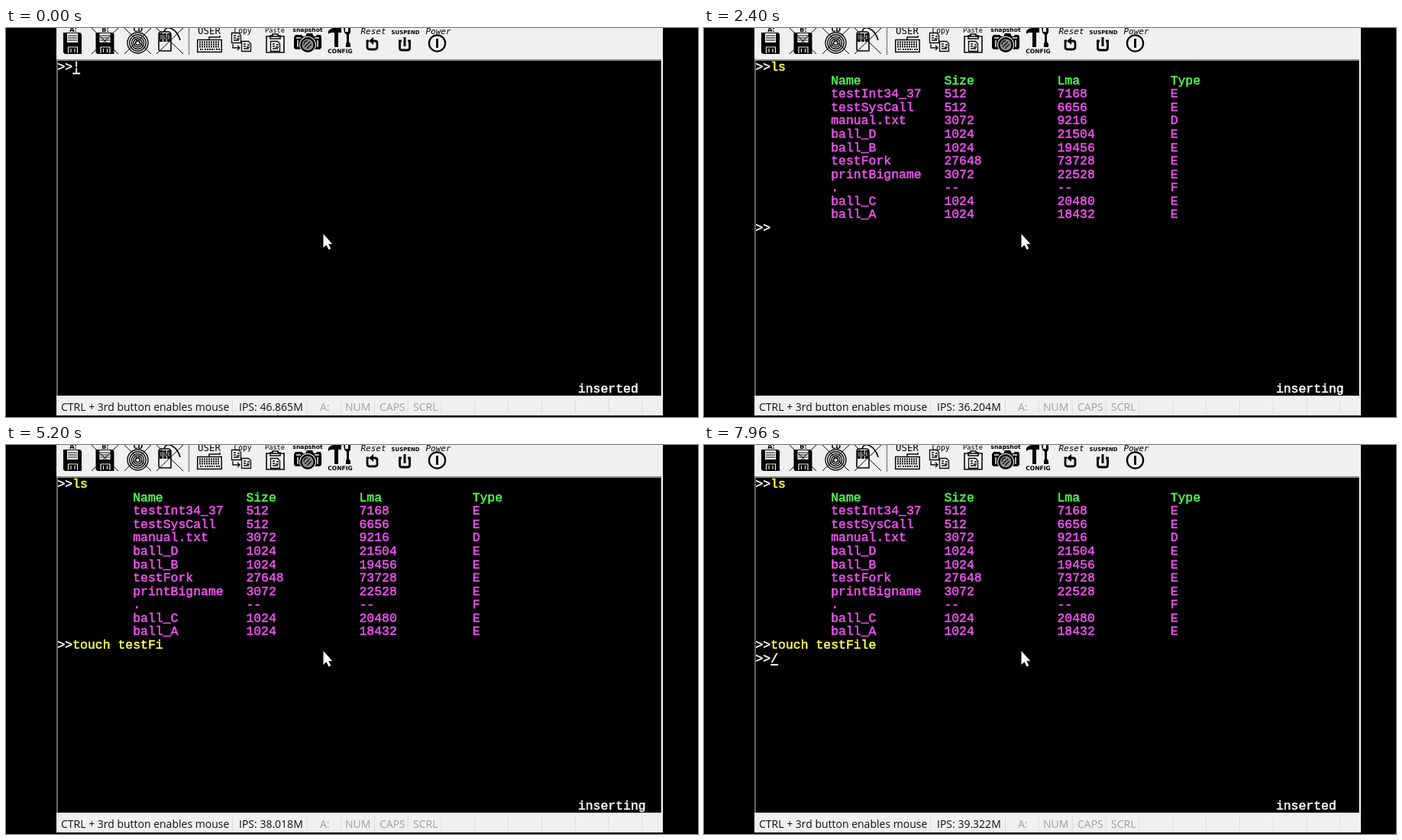
An HTML page that plays this animation: 906 px wide and 510 px high, repeating every 8000 ms.

```html
<!DOCTYPE html>
<html lang="en">
<head>
<meta charset="utf-8">
<title>Terminal session</title>
<style>
html, body { margin: 0; width: 100%; height: 100%; overflow: hidden; background: #000; }
svg { display: block; width: 100%; height: 100%; }
text { white-space: pre; }
#screen text { font: 16.458px "Liberation Mono", monospace; stroke-width: .55; }
#status text { font: 14px "Open Sans", "Noto Sans", sans-serif; fill: #101010; }
#status .off { fill: #a0a0a0; }
#labels text { font: bold 8px "DejaVu Sans", sans-serif; text-anchor: middle; }
#labels .mono { font-family: "DejaVu Sans Mono", monospace; font-weight: normal; }
#labels .slant { font: italic 11px "DejaVu Sans Mono", monospace; }
.line { fill: none; stroke: #080808; }
.pale { fill: #f0f0ee; }
.light { fill: none; stroke: #f0f0ee; }
</style>
</head>
<body>
<svg viewBox="0 0 906 510" preserveAspectRatio="none">
  <rect width="906" height="510"/>
  <g class="pale">
    <path d="M66 0h794v41h-794zM66 482h794v26h-794z"/>
    <path d="M857.7 41h2.3v442h-2.3z"/>
  </g>
  <path d="M66 42H858" stroke="#8c8c8a" stroke-width="2"/>
  <path d="M67 43V482" stroke="#a0a09e" stroke-width="1.3"/>
  <path d="M239.5 0V35" stroke="#8a8a88" stroke-width="1.5"/>

  <g id="icons">
    <defs>
      <g id="floppy">
        <path d="M0 6h22l2 2v26H2l-2-2z"/>
        <path class="pale" d="M5 7h14v12H5z"/>
        <path class="line" d="M6 10h12M6 13h12M6 16h12" stroke-width="1.2"/>
        <path class="light" d="M6.5 33v-8h12v8M10 27v5M15 27v5" stroke-width="1.2"/>
      </g>
      <path id="cross" class="line" d="M0 0L35 34M35 0L0 34" stroke-width="1"/>
      <g id="sheet">
        <path class="pale" d="M.5 .5h9l3 3v10H.5z" stroke="#080808" stroke-width="1.3"/>
        <path class="line" d="M3 4h3M8 5h3M3 7h3M7 8h4M3 10h7" stroke-width="1.5"/>
      </g>
    </defs>
    <use href="#floppy" x="75"/>
    <use href="#floppy" x="117.5"/>
    <use href="#cross" x="112"/>
    <g class="line" id="disc"></g>
    <use href="#cross" x="155"/>
    <path class="line" d="M200 8q0-3 4-3h8q4 0 4 4v21h-14q-2 0-2-3zM207 5q2-8 10-4t11 15" stroke-width="1.6"/>
    <path d="M201 7h4v11h-4zM206 7h4v11h-4zM211 7h4v11h-4z"/>
    <path class="light" d="M203 9v6M208 9v6M213 9v6" stroke-width="1"/>
    <use href="#cross" x="197"/>

    <path class="line" d="M250.7 15.5h31.5v16h-31.5zM266 15v-3h14v-2" stroke-width="1.5"/>
    <path class="line" d="M253 18.5h27M253 21.5h27M253 24.5h27M254 28h4M260 28h13M275 28h5" stroke-width="2" stroke-dasharray="2 1"/>

    <use href="#sheet" x="295" y="6"/>
    <use href="#sheet" x="308" y="17"/>
    <path class="line" d="M297 21v5h9m-3-3l3 3-3 3" stroke-width="1.3"/>

    <path class="line" d="M341 11h23v21h-23zM346 14h13v-4h-3v-2h-7v2h-3z" stroke-width="1.6"/>
    <use href="#sheet" x="346" y="17"/>

    <path d="M377 12l2-3h8l2 2h3l2-4h7l2 4h2l2-2h5l1 3v14l-2 2h-32l-2-2z"/>
    <path class="light" d="M380 13h6M404 13h6M382 16v9M408 16v9" stroke-width="1.5"/>
    <circle class="pale" cx="395" cy="22" r="11"/>
    <circle cx="395" cy="22" r="10"/>
    <circle cx="395" cy="22" r="7.5" fill="#8e8e8c"/>
    <path class="line" d="M390 22q0-5 5-5M391 25l7-7M394 27l6-6" stroke-width="1.3"/>

    <path d="M422 4q3-4 8-4h9v6h-4v19h-5V6h-4q-2 0-4 2z"/>
    <path d="M442 0h2v5h4V0h3v6l-2 3v9l2 3v4h-6v-4l1-3V9l-3-3z"/>

    <path class="line" d="M475 17h-2v8q0 3 3 3h7q3 0 3-3v-5q0-3-3-3h-4" stroke-width="2.8"/>
    <path d="M475 17l6-5v10z"/>
    <path class="line" d="M518 17h-2.5v9q0 3 3 3h7q3 0 3-3v-9h-2.5M522 12v12" stroke-width="3"/>
    <circle class="line" cx="564.5" cy="20" r="10.6" stroke-width="2.3"/>
    <path class="line" d="M564.5 14v12" stroke-width="3"/>
  </g>
  <g id="labels"></g>
  <g id="status"></g>
  <g id="screen"></g>
  <path d="M415.5 270v18l4-3.6 3 6.2 2.8-1.3-3-6h5z" fill="#fff"/>
</svg>
<script>
const NS = "http://www.w3.org/2000/svg";
const LOOP = 8000, CELL = 9.875, ROW = 17.58, LEFT = 67.5, TOP = 43;
const WHITE = "#fafafa", YELLOW = "#fafa50", GREEN = "#52f852", PINK = "#f052f0";
const $ = id => document.getElementById(id);

function add(parent, tag, attrs, content = "") {
  const node = document.createElementNS(NS, tag);
  for (const key in attrs) node.setAttribute(key, attrs[key]);
  node.textContent = content;
  parent.appendChild(node);
  return node;
}

const colX = col => LEFT + col * CELL;
const rowY = row => TOP + row * ROW;
const print = (parent, col, row, color, str) =>
  add(parent, "text", { x: colX(col), y: rowY(row) + 13.1, fill: color, stroke: color }, str);

for (const r of [3, 5.5, 8, 10.7, 13.5])
  add($("disc"), "circle", { cx: 172.5, cy: 19.5, r, "stroke-width": 1.4 });

const labels = [
  ["A:", 88, 5, ""], ["B:", 130, 5, ""], ["CD", 173, 5, ""],
  ["USER", 266, 8, "mono", 12.4], ["Copy", 310, 7, "mono", 9.6], ["Paste", 352, 6, "mono", 8.6],
  ["snapshot", 395, 5, "", 7.6], ["CONFIG", 437.5, 33, "", 7.6],
  ["Reset", 481, 8, "slant"], ["SUSPEND", 523, 8, "", 6.9], ["Power", 566, 8, "slant"]
];
for (const [str, x, y, cls, size] of labels)
  add($("labels"), "text", { x, y, class: cls, style: size ? `font-size:${size}px` : "" }, str);

const bar = $("status");
for (let i = 0; i < 12; i++)
  add(bar, "path", { d: `M${i ? 394.5 + (i - 1) * 43.85 : 296.5} 486v19`, stroke: "#dcdcda" });
add(bar, "text", { x: 72, y: 501.5 }, "CTRL + 3rd button enables mouse");
const ips = add(bar, "text", { x: 305, y: 501.5 });
[["A:", 411], ["NUM", 444], ["CAPS", 489], ["SCRL", 533]]
  .forEach(([str, x]) => add(bar, "text", { x, y: 501.5, class: "off" }, str));

const screen = $("screen");
const listing = add(screen, "g", {});
const files = `Name Size Lma Type
testInt34_37 512 7168 E
testSysCall 512 6656 E
manual.txt 3072 9216 D
ball_D 1024 21504 E
ball_B 1024 19456 E
testFork 27648 73728 E
printBigname 3072 22528 E
. -- -- F
ball_C 1024 20480 E
ball_A 1024 18432 E`;
files.split("\n").forEach((line, i) =>
  line.split(" ").forEach((word, j) =>
    print(listing, 10 + 15 * j, i + 1, i ? PINK : GREEN, word)));

// Each command: screen row, text, key times and the time of Enter.
const commands = [
  { row: 0, str: "ls", keys: [1760, 1960], enter: 2400 },
  { row: 12, str: "touch testFile", enter: 5880,
    keys: [2880, 3040, 3240, 3400, 3560, 3720, 3880, 4000, 4120, 4440, 4920, 5160, 5360, 5520] },
  { row: 13, str: "", keys: [], enter: Infinity }
];
for (const c of commands) {
  c.prompt = print(screen, 0, c.row, WHITE, ">>");
  c.typed = print(screen, 2, c.row, YELLOW, "");
}
const keyTimes = commands.flatMap(c => [...c.keys, c.enter]);
const spinner = print(screen, 0, 0, WHITE, "");
const caret = add(screen, "rect", { width: CELL, height: 2, fill: WHITE });
const notice = print(screen, 69, 24, WHITE, "");
const speeds = [46.865, 34.665, 36.204, 35.513, 35.412, 38.018, 32.681, 39.322];

function draw(t) {
  const active = commands.findIndex(c => t < c.enter);
  let count = 0;
  commands.forEach((c, i) => {
    const n = c.keys.filter(k => k <= t).length;
    c.prompt.style.display = i <= active ? "" : "none";
    c.typed.textContent = c.str.slice(0, n);
    if (i === active) count = n;
  });
  listing.style.display = active ? "" : "none";

  const busy = keyTimes.some(k => t >= k && t < k + 80);
  const col = 2 + count, row = commands[active].row;
  const color = count ? YELLOW : WHITE;
  spinner.setAttribute("x", colX(col));
  spinner.setAttribute("y", rowY(row) + 13.1);
  spinner.setAttribute("fill", color);
  spinner.setAttribute("stroke", color);
  spinner.textContent = busy ? "" : "¦/-\\"[Math.floor(4 * (t / 413.5 + 0.005)) % 4];
  caret.setAttribute("x", colX(col));
  caret.setAttribute("y", rowY(row) + 15.6);
  caret.style.display = (t / 530 + 0.1) % 1 < 0.5 ? "" : "none";
  notice.textContent = busy ? "inserting" : "inserted";
  ips.textContent = `IPS: ${speeds[Math.floor(t / 1000)].toFixed(3)}M`;
}

const start = performance.now();
function tick() {
  draw((performance.now() - start) % LOOP);
  requestAnimationFrame(tick);
}
tick();
</script>
</body>
</html>
```
